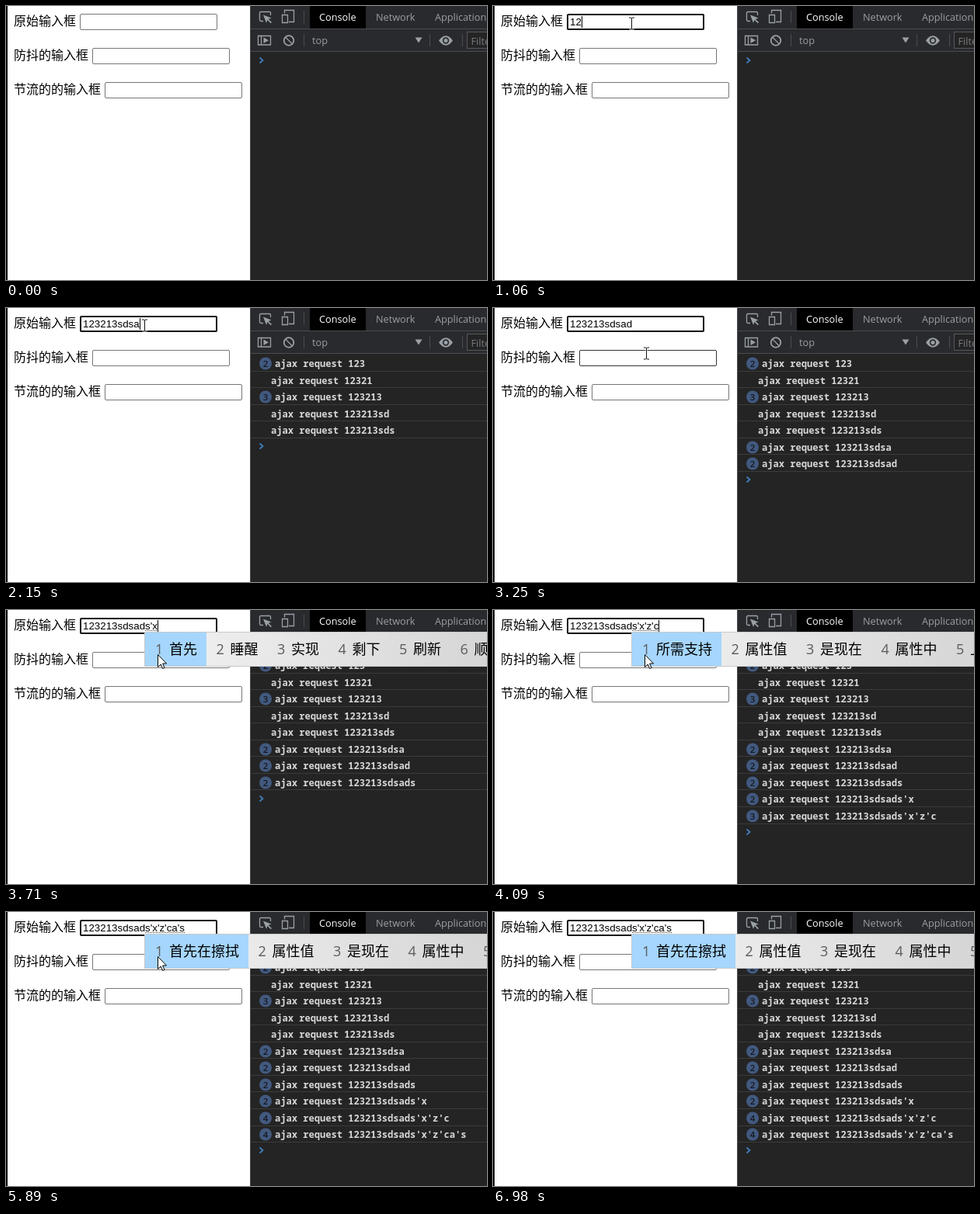
These frames come from a looping animation (619x353 px, 7210 ms). An HTML page:

```html
<!DOCTYPE html>
<html lang="zh-CN">
<head>
<meta charset="utf-8">
<title>Debounce and throttle inputs</title>
<style>
html, body { margin: 0; width: 100%; height: 100%; overflow: hidden; background: #fff; }
svg { display: block; width: 619px; height: 353px; }
text { white-space: pre; }
.cjk { font-family: "Noto Sans CJK SC", "Noto Sans CJK", "Noto Sans SC", sans-serif; }
.label { font-size: 16px; fill: #000; }
.value { font: 13.333px "Liberation Sans", Arial, sans-serif; fill: #000; }
.ui { font: 12.7px "Open Sans", "Noto Sans", sans-serif; fill: #9aa0a6; }
.log { font: 600 12.08px "Noto Sans Mono", "DejaVu Sans Mono", monospace; fill: #d8d8d8; }
.badge { font: 600 11.5px "Open Sans", sans-serif; fill: #14181f; text-anchor: middle; }
.pick { font-size: 18px; fill: #000; }
.num { font: 18px "Open Sans", "Noto Sans", sans-serif; fill: #5c5c5c; }
.icon { fill: none; stroke: #9aa0a6; stroke-width: 1.3; }
.solid { fill: #9aa0a6; }
</style>
</head>
<body>
<svg viewBox="0 0 619 353" xmlns="http://www.w3.org/2000/svg">
  <defs>
    <linearGradient id="shade"><stop offset="0" stop-color="#f3f3f3"/><stop offset="1" stop-color="#d5d5d5"/></linearGradient>
  </defs>
  <rect width="619" height="353" fill="#fff"/>
  <rect width="2" height="353" fill="#000"/>
  <g id="fields"></g>
  <rect id="ring" x="96" y="11" width="175" height="19" rx="1.5" fill="none" stroke="#101010" stroke-width="2"/>
  <text id="value" class="value" x="99" y="25"></text>
  <path id="under" stroke="#333" stroke-dasharray="1 1"/>
  <rect id="caret" y="13" width="1" height="15"/>

  <rect x="314" width="305" height="353" fill="#242424"/>
  <rect x="315" width="304" height="58" fill="#292a2d"/>
  <rect x="314" width="1" height="353" fill="#4b4c4f"/>
  <rect x="391" width="72" height="29" fill="#000"/>
  <path d="M315 29.5H619M315 58.5H619M383.5 6V22M383.5 36V52M545.5 36V52M587.5 36V52" stroke="#494c50" fill="none"/>
  <text class="ui" x="403" y="19" style="fill:#fff">Console</text>
  <text class="ui" x="476" y="19">Network</text>
  <text class="ui" x="552" y="19">Application</text>
  <path class="icon" d="M331 19.5h-3q-1.5 0-1.5-1.5V9q0-1.500 1.500-1.500h11q1.500 0 1.500 1.500v3"/>
  <path class="solid" d="M331 11.500L341.500 15.500L337.800 17L342 21L340.700 22.200L336.500 18L335 21.700Z"/>
  <path class="icon" d="M358.500 9.500V5.500H370.500V20.500H364M355.500 11.500H362.500V21.500H355.500Z"/>
  <path class="icon" d="M324.500 38.500H340.500V50H324.500ZM328.500 38.500V50"/>
  <path class="solid" d="M331.500 40.500L338 44.300L331.500 48Z"/>
  <path class="icon" stroke-width="2" d="M359.500 40L368.500 49"/>
  <circle class="icon" cx="364" cy="44.500" r="6.300" style="stroke-width:1.800"/>
  <text class="ui" x="394" y="48.500">top</text>
  <path class="solid" d="M526.500 40.500H535.500L531 47.500Z"/>
  <path class="solid" d="M557 44.500Q566 32 575 44.500Q566 57 557 44.500Z"/>
  <circle cx="566" cy="44.500" r="4.200" fill="#292a2d"/>
  <circle class="solid" cx="566" cy="44.500" r="2.500"/>
  <rect x="593.500" y="33.500" width="60" height="21" fill="#242424" stroke="#55585c"/>
  <text class="ui" x="598.500" y="49.500" style="fill:#777b80">Filter</text>

  <g id="rows"></g>
  <path id="prompt" d="M326.500 -3.500L330.500 0L326.500 3.500" fill="none" stroke="#4180c0" stroke-width="1.700"/>
  <g id="popup"></g>
  <path id="arrow" d="M.5 .5V16.500L4.200 13L6.700 18.500L9 17.500L6.600 12H11.500Z" fill="#fff" stroke="#000"/>
  <g id="beam" fill="none">
    <path d="M-3.500 -7.500H-1L0 -6.500L1 -7.500H3.500M0 -6.500V6.500M-3.500 7.500H-1L0 6.500L1 7.500H3.500" stroke="#fff" stroke-width="2.500" opacity=".7"/>
    <path d="M-3.500 -7.500H-1L0 -6.500L1 -7.500H3.500M0 -6.500V6.500M-3.500 7.500H-1L0 6.500L1 7.500H3.500" stroke="#111"/>
  </g>
</svg>
<script>
const LOOP = 7210, STEP = 75.6, BLINK = 540, ROW = 21.55, TOP = 60.5;
const FULL = "123213sdsads'x'z'ca's", COMPOSE = 11;

// [time, characters typed]
const keys = [[750, 0], [990, 1], [1060, 2], [1140, 3], [1210, 4], [1290, 5], [1370, 6],
  [1750, 7], [1920, 8], [1990, 9], [2150, 10], [2320, 11], [3330, 12], [3710, 14],
  [3940, 16], [4010, 18], [5330, 21]];

// [time, characters sent, repeat count]
const logs = [[1210, 3, 1], [1290, 3, 2], [1370, 5, 1], [1440, 6, 1], [1520, 6, 3],
  [1990, 8, 1], [2070, 9, 1], [2320, 10, 2], [2390, 11, 1], [3250, 11, 2], [3560, 12, 2],
  [3940, 14, 2], [4090, 18, 3], [4400, 18, 4], [5410, 21, 2], [5490, 21, 4]];

const picks = [
  [3330, "是 上 说 三 时 所 谁 水"],
  [3710, "首先 睡醒 实现 剩下 刷新 顺序"],
  [3940, "首先在 属性值 是现在 属性中 实现"],
  [4010, "所需支持 属性值 是现在 属性中 上下"],
  [5330, "首先在擦拭 属性值 是现在 属性中 首先"]
];

const boxes = [["原始输入框", 95, 10], ["防抖的输入框", 111, 54], ["节流的的输入框", 127, 98]];

const $ = id => document.getElementById(id);
const show = (el, on) => el.setAttribute("display", on ? "inline" : "none");
const moveTo = (el, x, y) => el.setAttribute("transform", `translate(${x} ${y})`);
const latest = (list, t) => list.filter(e => e[0] <= t).pop();
const ease = p => p * p * (3 - 2 * p);
const mix = (a, b, p) => a.map((v, i) => Math.round(v + (b[i] - v) * p));

$("fields").innerHTML = boxes.map(([label, x, y]) =>
  `<text class="cjk label" x="10" y="${y + 15}">${label}</text>
   <rect x="${x + .5}" y="${y + .5}" width="176" height="20" rx="1.5" fill="#fff"/>`).join("");
const frames = [...$("fields").querySelectorAll("rect")];

function pointer(t) {
  if (t < 70 || t >= 6980) return null;
  const since = start => Math.floor((t - start) / STEP);
  const first = [178, 22], rest = [196, 58];
  if (t < 820) return mix([495, 278], [176, 22], ease(Math.min(1, since(70) / 8)));
  if (t < 2320) return first;
  if (t < 2470) return mix(first, rest, (since(2320) + 1) / 3);
  if (t < 6290) return rest;
  return mix(rest, [563, 323], ease(Math.min(1, (since(6290) + 1) / 9)));
}

function rowsAt(t) {
  const rows = new Map();
  for (const [at, len, count] of logs) if (at <= t) rows.set(len, count);
  return [...rows];
}

function drawRow([len, count], i) {
  const y = TOP + ROW * i, base = Math.ceil(y + 15);
  const badge = count > 1
    ? `<circle cx="334" cy="${base - 4.5}" r="8" fill="#42597f"/><text class="badge" x="334" y="${base}">${count}</text>` : "";
  return `${badge}<text class="log" x="${count > 1 ? 346 : 341}" y="${base}">ajax request ${FULL.slice(0, len)}</text>
    <rect x="315" y="${Math.floor(y + ROW) - 1}" width="304" height="1" fill="#3b3b3b"/>`;
}

function drawPopup(words) {
  let x = 192;
  const items = words.map((word, i) => {
    const item = `<text class="num" x="${x}" y="57">${i + 1}</text><text class="cjk pick" x="${x + 18}" y="57">${word}</text>`;
    x += 42.5 + 18 * word.length;
    return item;
  });
  return `<rect x="178.5" y="28.5" width="450" height="44" fill="url(#shade)" stroke="#c9c9c9"/>
    <rect x="179" y="29" width="${43 + 18 * words[0].length}" height="43" fill="#a6d6fd"/>${items.join("")}`;
}

const cache = {};
function put(id, html) {
  if (cache[id] !== html) $(id).innerHTML = cache[id] = html;
}

function render(t) {
  const key = latest(keys, t), pick = latest(picks, t), pos = pointer(t);
  const len = key ? key[1] : 0, value = $("value");

  value.textContent = FULL.slice(0, len);
  const end = Math.round(99 + (len ? value.getComputedTextLength() : 0));
  show($("ring"), key);
  show($("caret"), key && Math.floor((t - key[0]) / BLINK) % 2 === 0);
  $("caret").setAttribute("x", end);
  show($("under"), len > COMPOSE);
  $("under").setAttribute("d", `M179 26.5H${end}`);

  const rows = rowsAt(t);
  put("rows", rows.map(drawRow).join(""));
  moveTo($("prompt"), 0, Math.round(TOP + ROW * rows.length + 9.8));
  put("popup", pick ? drawPopup(pick[1].split(" ")) : "");

  let over = false;
  frames.forEach((frame, i) => {
    const [, x, y] = boxes[i];
    const hit = pos && !pick && pos[0] >= x && pos[0] < x + 177 && pos[1] >= y && pos[1] < y + 21;
    over = over || hit;
    frame.setAttribute("stroke", hit ? "#333" : "#767676");
  });
  show($("beam"), pos && over);
  show($("arrow"), pos && !over);
  if (pos) {
    moveTo($("beam"), pos[0] + (t < 2320 ? .5 : 1.5), pos[1] + .5);
    moveTo($("arrow"), pos[0] - 1, pos[1] - 1);
  }
}

const begin = performance.now();
function tick() {
  render((performance.now() - begin) % LOOP);
  requestAnimationFrame(tick);
}
tick();
</script>
</body>
</html>
```
